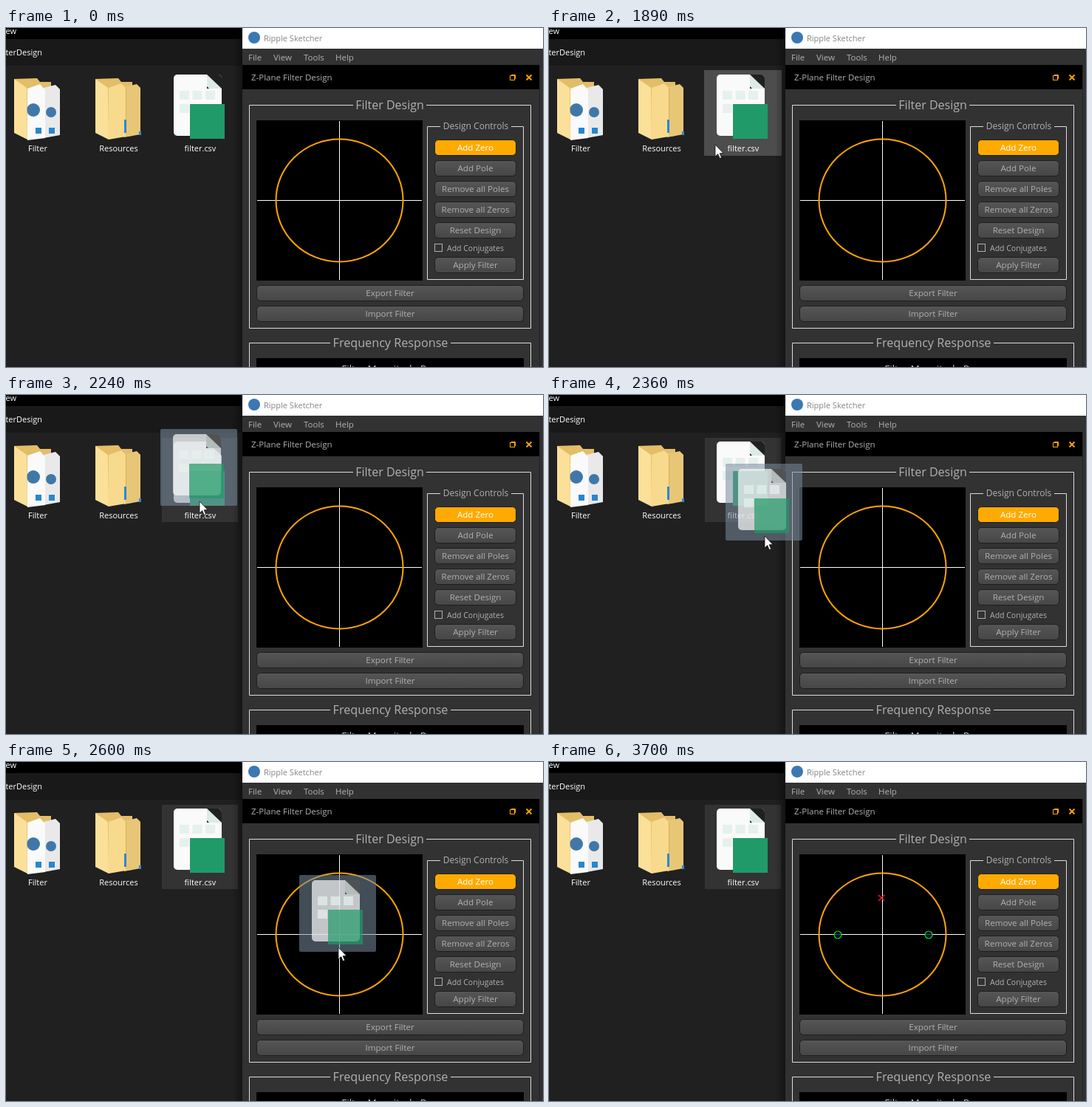
Recreate the animation shown at these times as an HTML page with a canvas. Size 727 by 459 pixels, loop 5.39 s.

```html
<!DOCTYPE html>
<html lang="en">
<head>
<meta charset="utf-8">
<title>Drag and drop demo</title>
<style>
html, body { margin: 0; width: 100%; height: 100%; overflow: hidden; background: #202020; }
canvas { display: block; }
</style>
</head>
<body>
<canvas id="stage" width="727" height="459"></canvas>
<script>
const ctx = document.getElementById('stage').getContext('2d');
const LOOP = 5390;
const ORANGE = '#ffa500', GREY = '#b1b1b1', PANEL = '#323232';
const DROP = 3100, GRAB = 2180, EXIT = 3700;

// Pointer positions, each held until the next: [ms, x, y]
const pointerPath = [
  [1600, 216, 450], [1650, 217, 405], [1710, 218, 340], [1770, 220, 268], [1830, 222, 204],
  [1890, 225, 158], [1950, 233, 138], [2010, 243, 127], [2070, 251, 121], [2130, 256, 119],
  [2180, 257, 120], [2240, 262, 144], [2300, 273, 167], [2360, 292, 191], [2420, 317, 215],
  [2490, 349, 238], [2540, 395, 245], [2600, 450, 251], [2660, 490, 255], [3100, 475, 249],
  [3280, 476, 262], [3340, 479, 286], [3400, 482, 312], [3460, 486, 337], [3520, 489, 361],
  [3580, 492, 388], [3640, 494, 428]
];

function rect(x, y, w, h, fill) {
  ctx.fillStyle = fill;
  ctx.fillRect(x, y, w, h);
}

function poly(fill, ...points) {
  ctx.beginPath();
  for (let i = 0; i < points.length; i += 2) ctx.lineTo(points[i], points[i + 1]);
  ctx.closePath();
  ctx.fillStyle = fill;
  ctx.fill();
}

function line(color, width, ...points) {
  ctx.beginPath();
  ctx.moveTo(points[0], points[1]);
  for (let i = 2; i < points.length; i += 2) ctx.lineTo(points[i], points[i + 1]);
  ctx.strokeStyle = color;
  ctx.lineWidth = width;
  ctx.stroke();
}

function oval(x, y, rx, ry) {
  ctx.beginPath();
  ctx.ellipse(x, y, rx, ry, 0, 0, 7);
}

function disc(x, y, r, fill) {
  oval(x, y, r, r);
  ctx.fillStyle = fill;
  ctx.fill();
}

// y is the middle of the capital letters
function text(str, x, y, size, color = GREY, align = 'center') {
  ctx.font = `${size}px "Open Sans", sans-serif`;
  ctx.textAlign = align;
  ctx.fillStyle = color;
  ctx.fillText(str, x, y + size * 0.36);
}

function button(label, x, y, w, { checked = false, hover = false } = {}) {
  const shade = ctx.createLinearGradient(0, y, 0, y + 22);
  shade.addColorStop(0, checked ? '#ffaa00' : '#565656');
  shade.addColorStop(1, checked ? '#ffaa00' : '#464646');
  ctx.beginPath();
  ctx.roundRect(x + 0.5, y + 0.5, w - 1, 21, 5);
  ctx.fillStyle = shade;
  ctx.fill();
  ctx.strokeStyle = hover ? ORANGE : '#1e1e1e';
  ctx.lineWidth = hover ? 2 : 1;
  ctx.stroke();
  text(label, x + w / 2, y + 11, 11.6, checked ? '#fff' : GREY);
}

// Frame whose top edge is broken between gapLeft and gapRight for its title
function groupBox(label, x, y, right, bottom, gapLeft, gapRight, size) {
  line('#dcdcdc', 1, gapLeft, y + 0.5, x + 0.5, y + 0.5, x + 0.5, bottom - 0.5,
    right - 0.5, bottom - 0.5, right - 0.5, y + 0.5, gapRight, y + 0.5);
  text(label, (gapLeft + gapRight) / 2, y, size);
}

function folder(x, drawContents) {
  ctx.save();
  ctx.translate(x, 67);
  poly('#e3bd68', 0, 2, 31, 1, 35, 6, 50, 6, 50, 79, 18, 82);
  drawContents();
  poly('#fbe09a', 0, 2, 17, 14, 18, 84, 0, 75);
  ctx.restore();
}

function scriptPages() {
  poly('#e9e9e9', 40, 14, 56, 10, 62, 16, 62, 78, 40, 82);
  disc(50, 47, 7, '#3f78a8');
  rect(47, 68, 8, 8, '#2787cf');
  poly('#fafafa', 18, 15, 35, 9, 42, 17, 42, 82, 18, 85);
  disc(26, 44, 9, '#3f78a8');
  rect(29, 68, 8, 8, '#2787cf');
}

function innerFolders() {
  poly('#e8c678', 39, 13, 56, 9, 61, 14, 61, 77, 39, 81);
  rect(59, 73, 3, 5, '#2f86cf');
  poly('#f7da8d', 18, 14, 35, 8, 41, 14, 41, 80, 18, 84);
  rect(39, 57, 3, 18, '#2f86cf');
  line('#d5b05b', 1, 41.5, 14, 41.5, 56);
}

function sheetIcon() {
  ctx.beginPath();
  ctx.roundRect(227, 63, 65, 83, 5);
  ctx.fillStyle = '#fafafa';
  ctx.fill();
  ctx.save();
  ctx.clip();
  rect(272, 62, 21, 20, '#202020');
  ctx.restore();
  poly('#dcebe5', 272, 63, 292, 82, 275, 82, 272, 79);
  for (const [col, row] of [[0, 0], [1, 0], [2, 0], [0, 1]])
    rect(235 + col * 17.5, 85 + row * 18, 13, 12, '#e6f1ed');
  rect(249, 103, 47, 47, '#219a69');
}

function explorer(t, pointer) {
  rect(0, 0, 320, 459, '#202020');
  rect(0, 0, 320, 51, '#191919');
  rect(0, 0, 320, 15, '#000');
  text('View', 14, 4, 11, '#fff', 'right');
  text('FilterDesign', 49, 33, 11, '#fff', 'right');

  const hovered = pointer && t < GRAB && pointer[1] >= 210 && pointer[2] < 173;
  if (hovered) rect(210, 57, 105, 116, '#4d4d4d');
  else if (t >= GRAB) rect(211, 58, 103, 114, '#333');

  const shadow = ctx.createLinearGradient(306, 0, 320, 0);
  shadow.addColorStop(0, 'rgba(0,0,0,0)');
  shadow.addColorStop(1, 'rgba(0,0,0,.35)');
  rect(306, 15, 14, 444, shadow);

  folder(11, scriptPages);
  folder(121, innerFolders);
  sheetIcon();
  text('Filter', 43, 163, 11, '#fff');
  text('Resources', 152.5, 163, 11, '#fff');
  text('filter.csv', 263, 163, 11, '#fff');
}

function zPlane(t) {
  rect(339, 125, 225, 217, '#000');
  line('#fff', 1, 340, 233.5, 563, 233.5);
  line('#fff', 1, 451.5, 126, 451.5, 341);
  oval(451.5, 233.5, 86, 83);
  ctx.strokeStyle = ORANGE;
  ctx.lineWidth = 2;
  ctx.stroke();
  if (t < DROP) return;

  for (const x of [391, 514]) {
    disc(x, 234, 5, '#05051c');
    line('#3c3cc8', 1, x - 5, 233.5, x + 5, 233.5);
    oval(x, 234, 5, 5);
    ctx.strokeStyle = '#00f000';
    ctx.lineWidth = 1.2;
    ctx.stroke();
  }
  line('#f01428', 1.4, 446, 180, 454, 188);
  line('#f01428', 1.4, 454, 180, 446, 188);
}

function autoRangeButton() {
  ctx.beginPath();
  ctx.roundRect(339.5, 328.5, 13, 13, 2);
  ctx.fillStyle = '#222';
  ctx.fill();
  ctx.strokeStyle = '#aaa';
  ctx.lineWidth = 1;
  ctx.stroke();
  text('A', 346, 335, 12, '#ddd');
}

function designer(t, pointer) {
  rect(320, 0, 407, 459, PANEL);
  rect(320, 0, 407, 28, '#fff');
  disc(336, 13, 8, '#3a78b4');
  text('Ripple Sketcher', 349, 14, 11, '#858585', 'left');
  text('File', 328, 40, 11.5, GREY, 'left');
  text('View', 362, 40, 11.5, GREY, 'left');
  text('Tools', 403, 40, 11.5, GREY, 'left');
  text('Help', 446, 40, 11.5, GREY, 'left');

  rect(320, 50, 402, 33, '#000');
  rect(722, 50, 1, 409, '#242424');
  text('Z-Plane Filter Design', 332, 67, 11.5, GREY, 'left');
  ctx.strokeStyle = ORANGE;
  ctx.lineWidth = 1;
  ctx.strokeRect(682.5, 64.5, 6, 6);
  line(ORANGE, 1, 684, 63.5, 689.5, 63.5, 689.5, 69);
  line(ORANGE, 1.8, 704.5, 63.5, 711.5, 70.5);
  line(ORANGE, 1.8, 711.5, 63.5, 704.5, 70.5);

  groupBox('Filter Design', 329, 104, 711, 407, 470, 569, 16);
  zPlane(t);
  groupBox('Design Controls', 570, 133, 701, 341, 588, 684, 12);
  button('Add Zero', 580, 151, 111, { checked: true });
  ['Add Pole', 'Remove all Poles', 'Remove all Zeros', 'Reset Design']
    .forEach((label, i) => button(label, 580, 179 + i * 28, 111));
  ctx.strokeStyle = GREY;
  ctx.lineWidth = 1;
  ctx.strokeRect(580.5, 292.5, 10, 10);
  text('Add Conjugates', 597, 298, 10.5, GREY, 'left');
  button('Apply Filter', 580, 310, 111);

  const over = y => pointer && pointer[2] >= y && pointer[2] < y + 22;
  button('Export Filter', 339, 348, 362, { hover: over(348) && t > DROP });
  button('Import Filter', 339, 376, 362, { hover: over(376) && t > DROP });

  groupBox('Frequency Response', 329, 426, 711, 500, 439, 602, 16.2);
  rect(339, 447, 362, 12, '#000');
  text('Filter Magnitude Response', 538, 461, 13.5, '#c8c8c8');

  if (t >= DROP && pointer && pointer[2] < 342) autoRangeButton();
}

function dragImage(x, y) {
  ctx.save();
  ctx.translate(x - 262, y - 144);
  ctx.beginPath();
  ctx.roundRect(209, 46, 104, 104, 2);
  ctx.fillStyle = 'rgba(120,140,160,.55)';
  ctx.fill();
  ctx.globalAlpha = 0.7;
  ctx.translate(-1, -10);
  sheetIcon();
  ctx.restore();
}

function arrow(x, y) {
  ctx.save();
  ctx.translate(x, y);
  poly('#fff', 0, 0, 0, 16, 3.7, 12.6, 6.2, 18.5, 8.6, 17.4, 6.1, 11.7, 11, 11.5);
  ctx.strokeStyle = '#000';
  ctx.lineWidth = 0.7;
  ctx.stroke();
  ctx.restore();
}

function draw(t) {
  const pointer = t < EXIT ? pointerPath.findLast(step => step[0] <= t) : undefined;
  explorer(t, pointer);
  designer(t, pointer);
  if (!pointer) return;
  const [, x, y] = pointer;
  const enteringWindow = t >= 2490 && t < 2540;
  if (t >= GRAB && t < DROP && !enteringWindow) dragImage(x, y);
  arrow(x, y);
}

const start = performance.now();
function tick() {
  draw((performance.now() - start) % LOOP);
  requestAnimationFrame(tick);
}
tick();
</script>
</body>
</html>
```
